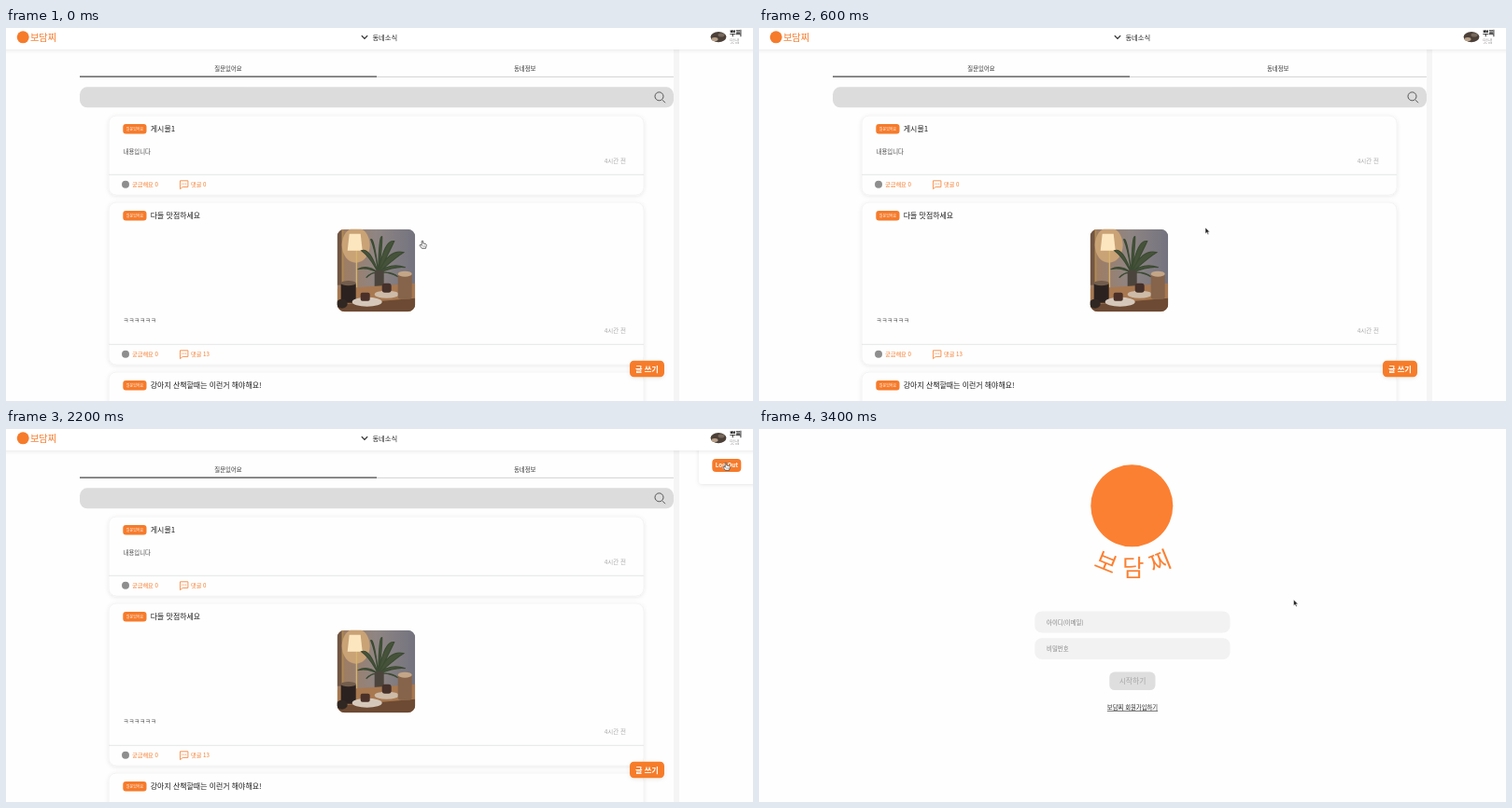
Animation of 800x400 px, one loop 3600 ms. Source, as an HTML page:

```html
<!DOCTYPE html>
<html lang="ko">
<head>
<meta charset="utf-8">
<title>동네소식</title>
<style>
html, body { margin: 0; width: 100%; height: 100%; overflow: hidden; background: #fefefe; }
svg { display: block; width: 100vw; height: 100vh; }
text { font-family: "Noto Sans CJK KR", "Noto Sans CJK", "Noto Sans", sans-serif; white-space: pre; }
</style>
</head>
<body>
<svg id="stage" viewBox="0 0 800 400" xmlns="http://www.w3.org/2000/svg"></svg>
<script>
const ORANGE = '#f67b2b';
const BRAND = '보담찌';
const STEP = 200, STEPS = 18;

// Text placed by its vertical middle
const text = (x, y, size, str, fill = '#222', weight = 400, anchor = 'start', extra = '') =>
  `<text x="${x}" y="${(y + size * 0.37).toFixed(2)}" font-size="${size}" fill="${fill}" font-weight="${weight}" text-anchor="${anchor}" ${extra}>${str}</text>`;
const rect = (x, y, w, h, r, fill, extra = '') =>
  `<rect x="${x}" y="${y}" width="${w}" height="${h}" rx="${r}" fill="${fill}" ${extra}/>`;
const line = (x1, x2, y, color, w) =>
  `<path d="M${x1} ${y}H${x2}" stroke="${color}" stroke-width="${w}"/>`;
const circle = (x, y, r, fill) => `<circle cx="${x}" cy="${y}" r="${r}" fill="${fill}"/>`;
const ellipse = (x, y, rx, ry, fill) => `<ellipse cx="${x}" cy="${y}" rx="${rx}" ry="${ry}" fill="${fill}"/>`;

function bubble(x, y) {
  return `<path d="M${x} ${y - 4}h8.4v6.6h-5.6l-2.8 2.2z" fill="none" stroke="${ORANGE}" stroke-width=".8" stroke-linejoin="round"/>` +
    [2.2, 4.2, 6.2].map(d => circle(x + d, y - .7, .55, ORANGE)).join('');
}

function card(top, height, title, body, comments, bodyAt) {
  const end = top + height;
  return rect(110, top, 573, height, 8, '#fefefe', 'stroke="#f1f1f1" stroke-width=".8" filter="url(#soft)"') +
    rect(125.3, top + 9, 25.2, 10.4, 3, ORANGE) +
    text(138, top + 14.3, 4, '질문있어요', '#fff', 500, 'middle') +
    text(154.8, top + 14.3, 7.95, title, '#1c1c1c', 500) +
    text(125.5, top + bodyAt, 6.4, body, '#4a4a4a') +
    text(664, end - 36, 6.5, '4시간 전', '#aaa', 400, 'end') +
    line(110, 683, end - 21.7, '#e3e6e6', .9) +
    circle(128, end - 11.2, 4, '#8e8e8e') +
    text(135, end - 11.2, 6.2, '궁금해요 0', ORANGE, 500) +
    bubble(186.5, end - 11.2) +
    text(198, end - 11.2, 6.2, '댓글 ' + comments, ORANGE, 500);
}

// Simplified still life: lamp, palm, cups and plates
function photo(x, y) {
  const leaves = [[-24, 8], [-20, -12], [-10, -24], [2, -27], [15, -22], [25, -10], [27, 6], [19, 16], [-15, 17]]
    .map(([dx, dy]) => `M44 47Q${44 + dx * .45} ${30 + dy * .9} ${46 + dx} ${35 + dy}Q${47 + dx * .6} ${36 + dy * .55} 44 47`).join('');
  return `<g transform="translate(${x} ${y})" clip-path="url(#photoClip)">` +
    rect(0, 0, 83.5, 88.5, 0, 'url(#wall)') +
    rect(0, 0, 5, 60, 0, '#725644') +
    rect(5, 0, 1.6, 58, 0, '#b08a52') +
    ellipse(20, 17, 15, 19, '#c9a276') +
    rect(20, 22, 1.4, 42, 0, '#d8b36c') +
    '<path d="M13 5h12l2 18H11z" fill="#fbe6c0"/>' +
    `<path d="${leaves}" fill="#46533a" stroke="#3b4a32" stroke-width="1.2"/>` +
    rect(40, 44, 10, 20, 2, '#4b443c') +
    '<path d="M0 64L83.5 58V88.5H0z" fill="#a87850"/><path d="M0 81L83.5 74V88.5H0z" fill="#6d4a33"/>' +
    rect(4, 57, 16, 22, 3, '#2b2220') + ellipse(12, 58, 8, 2.6, '#735d4c') +
    ellipse(32, 78, 16, 5, '#d5c8bb') + rect(25, 68, 10, 9, 2, '#4a3028') +
    ellipse(53, 70, 13, 4, '#cdbba8') + rect(48, 58, 10, 10, 3, '#46302a') +
    rect(65, 46, 15, 29, 3, '#85644b') + ellipse(72.5, 48, 7.5, 3, '#c3a687') +
    ellipse(5, 80, 6, 5, '#302722') + '</g>';
}

function board() {
  return rect(0, 0, 800, 400, 0, '#fefefe') +
    rect(715, 23, 6, 377, 0, '#f5f5f5') +
    '<g clip-path="url(#listClip)"><g id="list">' +
    card(94, 85, '게시물1', '내용입니다', 0, 38.5) +
    card(187, 174, '다들 맛점하세요', 'ㅋㅋㅋㅋㅋㅋ', 13, 127) +
    photo(354.7, 215.7) +
    card(369, 85, '강아지 산책할때는 이런거 해야해요!', '1. 000', 3, 38) +
    '</g></g>' +
    text(238, 44, 6.4, '질문있어요', '#333', 400, 'middle') +
    text(555.7, 44, 6.4, '동네정보', '#333', 400, 'middle') +
    line(79, 397, 52.2, '#444', 1.2) + line(397, 715, 52.4, '#c9c9c9', .8) +
    rect(79, 63.3, 636, 22, 8, '#dcdcdc') +
    '<path d="M703 77.2l3 3M704 73.3a4.5 4.5 0 1 1-9 0a4.5 4.5 0 1 1 9 0" fill="none" stroke="#555" stroke-width="1"/>' +
    rect(668, 356.7, 37, 17.6, 4.5, ORANGE, 'filter="url(#soft)"') +
    text(686.4, 365.5, 8.2, '글 쓰기', '#fff', 700, 'middle') +
    '<g id="menu">' +
    rect(742, 18, 64, 41, 4, '#fff', 'filter="url(#soft)"') +
    rect(756.3, 32, 31, 14, 4, ORANGE) +
    text(771.8, 39.2, 6.2, 'Log Out', '#fff', 700, 'middle') + '</g>' +
    rect(-5, -5, 810, 28, 0, '#fff', 'filter="url(#soft)"') +
    circle(18.2, 9.8, 6.5, ORANGE) +
    text(26, 9.8, 10.2, BRAND, ORANGE, 500) +
    '<path d="M380.8 8.2l3.2 3.2 3.2-3.2" fill="none" stroke="#222" stroke-width="1.1"/>' +
    text(392.4, 9.8, 7.3, '동네소식', '#222', 500) +
    ellipse(763, 9.6, 8.4, 5.6, '#4c4038') + ellipse(759, 12, 3.5, 2, '#b9a18a') + ellipse(766, 7.5, 3.5, 2, '#76685c') +
    text(775, 5, 7.1, '뿌찌', '#222', 700) +
    text(775, 14.2, 5.8, '맛냄', '#aaa');
}

function login() {
  const letters = [[372, 143, 22], [400.7, 149, 0], [429.3, 142, -22]];
  return rect(0, 0, 800, 400, 0, '#fefefe') +
    circle(399.3, 82.3, 44, '#fc8032') +
    letters.map(([x, y, a], i) =>
      text(x, y, 25.5, BRAND[i], '#fc8032', 500, 'middle', `transform="rotate(${a} ${x} ${y})"`)).join('') +
    rect(295.3, 195.6, 209.2, 22.8, 7.5, '#f2f2f2') +
    rect(295.3, 224.2, 209.2, 22.8, 7.5, '#f2f2f2') +
    text(308, 207.2, 6.4, '아이디(이메일)', '#858585') +
    text(308, 235.7, 6.4, '비밀번호', '#858585') +
    rect(375.3, 260.6, 49.2, 19.4, 5.5, '#dedede') +
    text(400, 270.2, 7.8, '시작하기', '#a5a5a5', 500, 'middle') +
    text(400, 298.6, 6.35, BRAND + ' 회원가입하기', '#222', 500, 'middle', 'text-decoration="underline"');
}

const defs = `<defs>
<filter id="soft" x="-10%" y="-40%" width="120%" height="190%"><feDropShadow dx="0" dy="1" stdDeviation="2" flood-opacity=".09"/></filter>
<linearGradient id="wall"><stop offset="0" stop-color="#a17b5d"/><stop offset=".5" stop-color="#8f8583"/><stop offset="1" stop-color="#73737f"/></linearGradient>
<clipPath id="photoClip"><rect width="83.5" height="88.5" rx="8"/></clipPath>
<clipPath id="listClip"><rect y="85.3" width="715" height="315"/></clipPath>
</defs>`;

const pointers = `<path id="arrow" d="M0 0V6.6L1.6 5.2 2.7 7.6 3.8 7.1 2.7 4.8H4.8z" fill="#222" stroke="#fff" stroke-width=".5"/>
<g id="hand"><path d="M-.8 .6Q0-.6 .8 .6V3L3.6 3.6Q4.5 4 4.2 5.5L3.5 8.3H-.6L-3 5.2Q-3 4.1-1.8 4.5L-.8 5.3z" fill="#fff" stroke="#444" stroke-width=".8" stroke-linejoin="round"/><path d="M.9 5v2M2.3 5v2" stroke="#777" stroke-width=".5"/></g>
<circle id="ring" cx="769" cy="41.8" r="8.4" fill="#000" fill-opacity=".08" stroke="#25201d" stroke-width="1.5"/>`;

const stage = document.getElementById('stage');
stage.innerHTML = defs + `<g id="board">${board()}</g><g id="login">${login()}</g>` + pointers;
const el = id => document.getElementById(id);
const show = (id, on) => el(id).setAttribute('display', on ? 'inline' : 'none');
const move = (id, x, y) => el(id).setAttribute('transform', `translate(${x} ${y})`);

// Pointer tip per step
const trail = [
  [446, 228], [450, 230], [451, 231], [478, 214], [640, 105], [725, 45],
  [778, 11], [779.5, 10.5], [779.5, 10.5], [779, 13], [776, 24], [771, 36],
  [769, 38], [769, 38], [769, 41], [768.5, 41.5], [662, 136], [572.5, 183]
];
const handSteps = [0, 6, 7, 8, 9, 11, 12, 13];

function draw(ms) {
  const n = Math.floor(ms / STEP) % STEPS;
  const out = n >= 14, hand = handSteps.includes(n);
  show('board', !out);
  show('login', out);
  show('menu', n >= 8 && !out);
  show('ring', n === 13);
  show('hand', hand);
  show('arrow', !hand);
  move('list', 0, n === 1 || n === 2 ? -90 : 0);
  move(hand ? 'hand' : 'arrow', ...trail[n]);
}

const start = performance.now();
function tick() {
  draw(performance.now() - start);
  requestAnimationFrame(tick);
}
tick();
</script>
</body>
</html>
```
